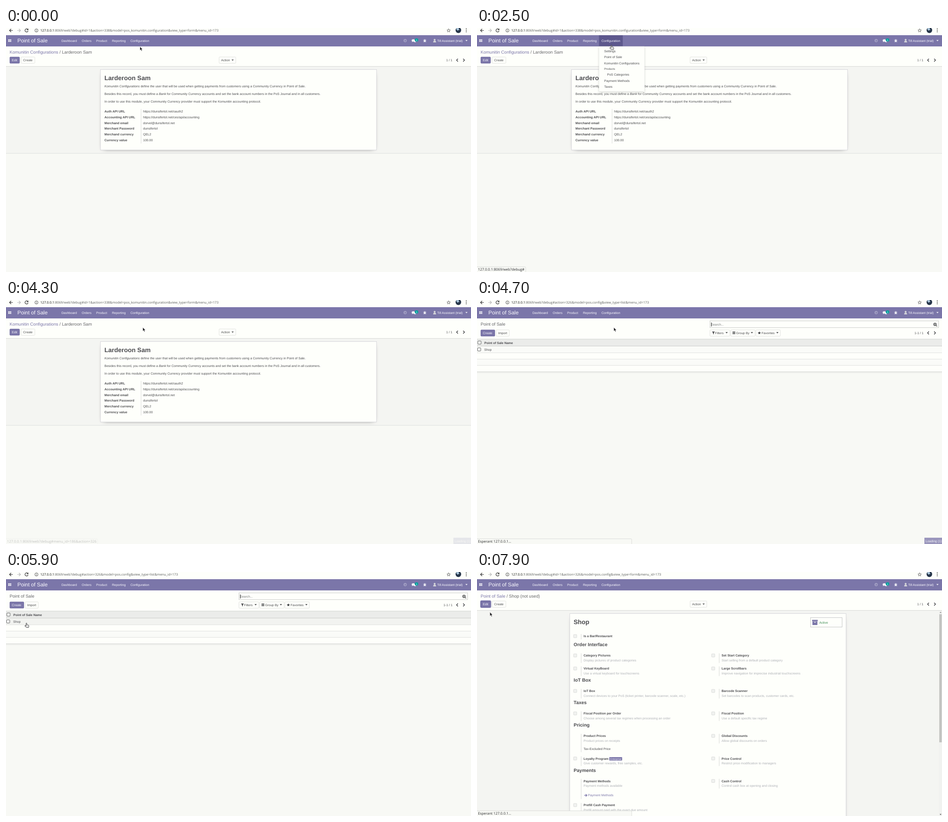
An HTML page for the animation above (8 s loop, 1031 by 543 pixels).

```html
<!DOCTYPE html>
<html lang="en">
<head>
<meta charset="utf-8">
<title>Point of Sale</title>
<style>
html, body { margin: 0; width: 100%; height: 100%; overflow: hidden; background: #f8f9f5; }
svg { display: block; width: 100%; height: 100%; }
text { font: 7px "Liberation Sans", Arial, sans-serif; fill: #4b4b4f; text-rendering: geometricPrecision; white-space: pre; }
.b { font-weight: bold; }
.i { font-style: italic; }
.w { fill: #fbfaff; }
.brand { font-size: 11.8px; }
.crumb { font-size: 9.66px; fill: #66666a; }
.link { fill: #7b76a9; }
.h1 { font-size: 13.95px; font-weight: bold; }
.h2 { font-size: 10.46px; font-weight: bold; }
.soft { fill: #adafb5; }
.hint { fill: #77797b; }
.ok { fill: #3a8a50; }
.small { font-size: 6.1px; }
.tiny { font-size: 5.4px; }
.url { font: 7.35px "Open Sans", "Noto Sans", sans-serif; fill: #5b5d5f; }
.host { fill: #0c0d0e; }
.status { font: 7.85px "Open Sans", "Noto Sans", sans-serif; fill: #2a2b2d; }
</style>
</head>
<body>
<svg viewBox="0 0 1031 543" xmlns="http://www.w3.org/2000/svg">
  <defs>
    <pattern id="hatch" width="3" height="3" patternUnits="userSpaceOnUse">
      <rect width="3" height="3" fill="#f8f8f5"/>
      <path d="M-1 1L1 -1M0 3L3 0M2 4L4 2" stroke="#eaebe8" stroke-width=".8"/>
    </pattern>
    <filter id="blur" x="-10%" y="-20%" width="120%" height="140%">
      <feGaussianBlur stdDeviation="5.4"/>
    </filter>
    <filter id="lift" x="-10%" y="-10%" width="120%" height="120%">
      <feDropShadow dx="0" dy="2" stdDeviation="2" flood-color="#000" flood-opacity=".15"/>
    </filter>
  </defs>
  <g id="stage"></g>
</svg>
<script>
const PURPLE = '#7b76a9', DARK = '#3f4043', WHITE = '#fefffb', PAGE = '#f8f9f5';
const HOST = '127.0.0.1', WEB = ':8069/web?debug#';

// Markup helpers
const rect = (x, y, w, h, fill, more = '') =>
  `<rect x="${x}" y="${y}" width="${w}" height="${h}" fill="${fill}" ${more}/>`;
const path = (d, stroke, width = 1, fill = 'none', more = '') =>
  `<path d="${d}" stroke="${stroke}" stroke-width="${width}" fill="${fill}" ${more}/>`;
const shape = (d, fill) => `<path d="${d}" fill="${fill}"/>`;
const text = (x, y, s, cls = '') => `<text x="${x}" y="${y}" class="${cls}">${s}</text>`;
const span = (s, cls) => `<tspan class="${cls}">${s}</tspan>`;
const group = (id, body) => `<g id="${id}">${body}</g>`;
const hline = (y, color, w = 1031) => rect(0, y, w, 1, color);
const caret = (x, y, fill = DARK) => shape(`M${x} ${y}h5l-2.5 2.6z`, fill);
const button = (x, y, w, label, main) =>
  rect(x + .5, y + .5, w - 1, 14, main ? PURPLE : WHITE, `rx="1.5" stroke="${main ? PURPLE : '#e2e3e0'}"`) +
  text(x + 5, y + 10.1, label, main ? 'w' : '');
const checkbox = (x, y, fill, stroke) => rect(x + .5, y + .5, 7, 7, fill, `stroke="${stroke}" rx=".8"`);
const chevrons = y => path(`M1002 ${y - 3.2}l-3 3.2 3 3.2M1013.6 ${y - 3.2}l3 3.2-3 3.2`, DARK, 1.5);

const star = (x, y, r) => 'M' + Array.from({ length: 10 }, (_, i) => {
  const a = i * Math.PI / 5 - Math.PI / 2, k = i % 2 ? r * .45 : r;
  return `${(x + k * Math.cos(a)).toFixed(2)} ${(y + k * Math.sin(a)).toFixed(2)}`;
}).join('L') + 'Z';

function browserBar() {
  return rect(0, 0, 1031, 16, WHITE) +
    path('M15 5.5H8M11.3 2L7.8 5.5l3.5 3.5', '#333', 1.2) +
    path('M25 5.5h7M28.7 2l3.5 3.5-3.5 3.5', '#b6b7b7', 1.2) +
    path('M48.3 3.2A3.5 3.5 0 1 0 49 6.3', '#333', 1.2) + shape('M49.5 1v3.7h-3.7z', '#333') +
    `<circle cx="67.5" cy="5.5" r="3.5" fill="none" stroke="#555"/>` +
    rect(67, 5, 1, 2.5, '#555') + rect(67, 3.3, 1, 1, '#555') +
    `<text x="76" y="8.2" class="url" id="url"></text>` +
    path(star(981.5, 5.7, 4), '#555', .9) +
    `<circle cx="1003" cy="5" r="6.2" fill="#27364a"/>` +
    shape('M998 2a6.2 6.2 0 0 1 5-3l2 5-4 2z', '#a9c3d8') +
    [1.8, 5.2, 8.6].map(y => `<circle cx="1020.5" cy="${y}" r="1" fill="#444"/>`).join('');
}

function navBar() {
  const items = [[123, 'Dashboard'], [168, 'Orders'], [200, 'Product'], [235, 'Reporting'], [276, 'Configuration']];
  const dim = '#cfcde2', lit = '#f2f1f8';
  return rect(0, 16, 1031, 25, PURPLE) +
    group('tab', rect(270.5, 16, 52.7, 25, '#5d588d')) +
    [0, 3.6].map(dx => rect(5 + dx, 25.2, 3, 2.5, lit) + rect(5 + dx, 28.4, 3, 2.5, lit)).join('') +
    text(25.3, 32.4, 'Point of Sale', 'brand w') +
    items.map(([x, s]) => text(x, 30.6, s, 'w')).join('') +
    `<circle cx="885" cy="28" r="3" fill="none" stroke="${dim}" stroke-width=".8"/>` +
    path('M885 26v2.2h-1.6', dim, .7) +
    `<ellipse cx="903" cy="27.6" rx="3.6" ry="2.7" fill="${lit}"/><ellipse cx="906" cy="29.5" rx="2.6" ry="2" fill="${lit}"/>` +
    shape('M900.5 29l-.6 2.6 3-1.6zM906 31l3 1-.8-2z', lit) +
    rect(906.5, 23, 7.5, 7.2, '#00a09d', 'rx="3.4"') + text(908.9, 28.5, '1', 'tiny w') +
    `<ellipse cx="928.5" cy="28.6" rx="1.9" ry="2.7" fill="${lit}"/>` +
    path('M925.3 26l2 1.5M931.7 26l-2 1.5M925 28.8h7M925.6 31.5l2-1.5M931.4 31.5l-2-1.5M927.2 25.4h2.6', lit, .8) +
    `<circle cx="950.4" cy="26.4" r="2.1" fill="#d6d6da"/>` +
    shape('M947 32q.1-3 2.2-3.4h2.4q2.1.4 2.2 3.4z', '#d6d6da') +
    text(956, 30.6, 'Till Assistant (trial)', 'w') + caret(1018.5, 26.8, lit);
}

const panel = (h, link, name) => rect(0, 41, 1031, h, WHITE) +
  text(8, 56.5, link ? span(link, 'link') + ' / ' + name : name, 'crumb');

const formPanel = (link, name) => panel(44, link, name) + hline(85, '#d6d7d5') +
  button(8, 64, 22.5, 'Edit', true) + button(33, 64, 31.5, 'Create') +
  button(472, 64, 38, 'Action') + caret(500, 70.2) +
  text(976, 74.2, '1 / 1') + chevrons(71.6);

const sheet = (x, y, w, h) =>
  rect(x + 8, y + 10.7, w - 16, h - 16, '#000', 'filter="url(#blur)"') +
  rect(x + .3, y + .5, w - .6, h - 1, WHITE, 'stroke="#c9c9d2" stroke-width=".7"');

function accountForm() {
  const fields = [
    ['Auth API URL', 'https://dunsifertol.net/oauth2'],
    ['Accounting API URL', 'https://dunsifertol.net/ces/api/accounting'],
    ['Merchand email', 'dorvel@dunsifertol.net'],
    ['Merchant Password', 'dunsifertol'],
    ['Merchand currency', 'QEL2'],
    ['Currency value', '100.00']
  ];
  return rect(0, 85, 1031, 194, 'url(#hatch)') + formPanel('Komunitin Configurations', 'Larderoon Sam') +
    hline(278.5, '#dedfdd') + sheet(209, 92, 613, 180) +
    text(218.3, 116.4, 'Larderoon Sam', 'h1') +
    text(218.3, 132.3, span('Komunitin Configurations', 'i') + ' define the user that will be used when getting payments from customers using a Community Currency in Point of Sale.') +
    text(218.3, 149, 'Besides this record, you must define a ' + span('Bank', 'i') + ' for Community Currency accounts and set the bank account numbers in the PoS Journal and in all customers.') +
    text(218.3, 165.6, 'In order to use this module, your Community Currency provider must support the Komunitin accounting protocol.') +
    rect(299, 180, 1, 77, '#dcdddc') +
    fields.map(([k, v], i) => text(218.3, 187.7 + 12.9 * i, k, 'b') + text(304, 187.7 + 12.9 * i, v)).join('');
}

function dropdown() {
  const items = [[282, 53.7, 'Settings'], [282, 67.2, 'Point of Sale'], [282, 80.6, 'Komunitin Configurations'],
    [282, 93, 'Products', 'small'], [288.5, 106.3, 'PoS Categories'], [282, 120, 'Payment Methods'], [282, 133.4, 'Taxes']];
  return rect(270.7, 41, 100.6, 100, WHITE, 'stroke="#e2e3e1" stroke-width=".5" filter="url(#lift)"') +
    `<rect id="pick" x="271" width="100" height="13.4" fill="#e8eaea"/>` +
    items.map(([x, y, s, cls]) => text(x, y, s, cls)).join('');
}

function shopList() {
  return panel(46, '', 'Point of Sale') +
    button(8, 66, 32, 'Create', true) + button(42, 66, 30, 'Import') +
    rect(516.5, 46.5, 507, 15, WHITE, 'stroke="#cbccca"') +
    text(519, 57.2, 'Search...', 'hint') +
    group('caret', rect(519, 50, 1, 9, '#222')) +
    `<circle cx="1015.5" cy="54.2" r="2.8" fill="none" stroke="${DARK}" stroke-width="1.3"/>` +
    path('M1017.6 56.3l2.5 2.6M1014 54.2h3', DARK, 1.2) +
    [[516, 45], [562, 55], [618, 55]].map(([x, w]) => button(x, 66, w, '')).join('') +
    shape('M521 70.2h6.4l-2.4 3v3.4l-1.6-1.2v-2.2z', DARK) + text(527.7, 75.8, 'Filters') + caret(551, 71.6) +
    [70.2, 72.4, 74.6].map(y => rect(566.5, y, 6.2, 1.3, DARK)).join('') + text(574.5, 75.8, 'Group By') + caret(607, 71.6) +
    shape(star(626, 73.4, 3.6), DARK) + text(631, 75.8, 'Favorites') + caret(663.5, 71.6) +
    text(970, 75.8, '1-1 / 1') + chevrons(73.2) +
    rect(0, 87, 1031, 15, '#ebecea') + hline(86.5, '#d2d3d1') + hline(102, '#cbccca') +
    checkbox(1.5, 90.7, WHITE, '#5b5c5e') + text(16.3, 97.5, 'Point of Sale Name', 'b') +
    `<rect id="row" y="103" width="1031" height="14"/>` +
    rect(0, 117, 1031, 42, WHITE) + rect(0, 132, 1031, 13, '#fafbf8') +
    hline(117, '#e0e1df') + hline(131, '#e0e1df') + hline(145, '#e0e1df') +
    rect(0, 159, 1031, 3.5, '#ecedea') + hline(159, '#d9dad8') +
    checkbox(.8, 106, WHITE, '#5b5c5e') + text(16, 112.5, 'Shop');
}

function shopForm() {
  const heads = [[161, 'Order Interface'], [240, 'IoT Box'], [290, 'Taxes'], [340, 'Pricing'], [441, 'Payments']];
  // column, centre line, title, description, bar height when there is no checkbox
  const options = [
    [0, 143, 'Is a Bar/Restaurant', ''],
    [0, 186, 'Category Pictures', 'Display pictures of product categories'],
    [1, 186, 'Set Start Category', 'Start selling from a default product category'],
    [0, 215, 'Virtual KeyBoard', 'Use a virtual keyboard for touchscreens'],
    [1, 215, 'Large Scrollbars', 'Improve navigation for imprecise industrial touchscreens'],
    [0, 265, 'IoT Box', 'Connect devices to your PoS (ticket printer, barcode scanner, scale, etc.)'],
    [1, 265, 'Barcode Scanner', 'Set barcodes to scan products, customer cards, etc.'],
    [0, 315, 'Fiscal Position per Order', 'Choose among several tax regimes when processing an order'],
    [1, 315, 'Fiscal Position', 'Use a default specific tax regime'],
    [0, 365, 'Product Prices', 'Product prices on receipts', 41],
    [1, 365, 'Global Discounts', 'Allow global discounts on orders'],
    [0, 415.3, 'Loyalty Program', 'Give customer rewards, free samples, etc.'],
    [1, 415.3, 'Price Control', 'Restrict price modification to managers'],
    [0, 465.3, 'Payment Methods', 'Payment methods available', 45],
    [1, 465.3, 'Cash Control', 'Control cash box at opening and closing'],
    [0, 519, 'Prefill Cash Payment', 'Prefill amount paid with the exact due amount']
  ];
  const option = ([col, y, title, desc, bar]) => {
    const x = 214 + 306 * col;
    return (bar ? '' : checkbox(x - .3, y - 4.3, '#f1f2f0', '#dadbd9')) +
      rect(x + 16.5, y - 5, 1, bar || (desc ? 21.5 : 12), '#d6d7d5') +
      text(x + 22.3, y + 2.4, title, 'b') + text(x + 22.3, y + 12.7, desc, 'soft');
  };
  return rect(0, 85, 1031, 458, 'url(#hatch)') + formPanel('Point of Sale', 'Shop (not used)') +
    rect(7.5, 63.5, 23.5, 16, 'none', 'rx="2" stroke="#aaa7cb" stroke-width="1.2"') +
    rect(8.5, 64.5, 21.5, 14, 'none', 'rx="1.5" stroke="#625d97"') +
    sheet(205.5, 92, 613, 480) + text(214.3, 116.4, 'Shop', 'h1') +
    rect(739.5, 101.5, 70, 21, WHITE, 'stroke="#c6c7c8"') +
    rect(743, 106.5, 12.5, 3.2, PURPLE) + rect(743.7, 110.2, 11, 7.8, PURPLE) + rect(747.4, 111.4, 3.8, 1.2, WHITE) +
    text(759, 114.6, 'Active', 'ok') +
    heads.map(([y, s]) => text(214.3, y + 3.8, s, 'h2')).join('') + options.map(option).join('') +
    text(236.3, 396.4, 'Tax-Excluded Price') +
    rect(293.3, 412, 28.5, 7.6, PURPLE, 'rx="1"') + text(295.3, 417.7, 'Enterprise', 'tiny w') +
    path('M238 497h5.5M241 494.3l2.8 2.7-2.8 2.7', PURPLE, 1.3) + text(246, 499.4, 'Payment Methods', 'link') +
    rect(1024.5, 86, 6.5, 457, '#f1f2f0') + rect(1025, 94, 5.5, 285, '#c2c3c1') +
    shape('M1025.8 91h4l-2-2.4z', '#8a8b8a') + shape('M1025.8 538.5h4l-2 2.4z', '#555');
}

const statusBar = `<path id="statusBox" fill="${PAGE}" stroke="#d4d5d2" stroke-width=".8"/>` +
  `<text id="statusText" class="status" x="2.2" y="540.4"></text>`;
const loadingBox = rect(992, 529, 39, 14, PURPLE) + text(994.8, 538.8, 'Loading (1)', 'w');
const arrow = path('M0 0V8.2L1.9 6.5 3.3 9.8 4.7 9.2 3.4 6H5.8Z', '#fff', .5, '#1d1d1f');
const hand = path('M-1 1a.9.9 0 0 1 1.8 0V4l3 .6q1.5.4 1.3 1.9L4.5 10H-.6L-3.7 6.5q-.2-1.2 1.1-.9L-1 7Z', '#2a2a2c', .9, '#fff') +
  path('M1 6.2v2M2.5 6.4v1.8', '#555', .5);

document.getElementById('stage').innerHTML = rect(0, 0, 1031, 543, PAGE) +
  group('account', accountForm()) + group('list', shopList()) + group('shop', shopForm()) +
  browserBar() + navBar() + group('menu', dropdown()) +
  group('status', statusBar) + group('loading', loadingBox) +
  group('pointer', group('arrow', arrow) + group('hand', hand));

const el = {};
document.querySelectorAll('[id]').forEach(n => el[n.id] = n);

// Timelines
const loadingFade = [[3600, 0], [3900, 1], [4000, 1], [4350, 0], [4400, 0], [4500, 1], [4600, 1], [5000, 0],
  [6200, 0], [6400, 1], [7300, 1], [7500, 0]];
const statusFade = [[400, 0], [900, 1], [4000, 1], [4400, 0], [4600, 0], [4700, 1], [5000, 1], [5300, 0], [7000, 0], [7100, 1]];
const pointerStops = [
  [0, 297, 41.5, 'arrow'], [200, 297, 42], [400, 298.5, 38.5, 'hand'], [1900, 298, 38.5], [2000, 298, 38],
  [2800, 298, 37.5], [2900, 298, 37], [3300, 300, 49], [3500, 303, 61], [3700, 303.3, 61, 'arrow'],
  [5500, 262, 72], [5600, 185, 92], [5700, 110, 108, 'hand'], [5800, 62, 115.5], [5900, 45.5, 113.5],
  [6000, 39.5, 113.5], [6200, 33, 112], [6300, 27, 111], [7100, 26, 111.5, 'arrow'], [7900, 28.7, 89.5]
];

function fade(keys, t) {
  const i = keys.findIndex(k => k[0] > t);
  if (i === 0) return keys[0][1];
  if (i < 0) return keys[keys.length - 1][1];
  const [t0, a] = keys[i - 1], [t1, b] = keys[i];
  return a + (b - a) * (t - t0) / (t1 - t0);
}

const within = (t, a, b) => t >= a && t < b;
const show = (node, on) => node.style.display = on ? '' : 'none';

function address(t) {
  const tail = '&view_type=';
  if (t < 4700) return 'id=1&action=338&model=pos_komunitin.configuration' + tail + 'form';
  if (t < 7100) return 'action=326&model=pos.config' + tail + 'list';
  return 'id=1&action=326&model=pos.config' + tail + 'form';
}

function statusLine(t) {
  if (t >= 4600) return [`Esperant ${HOST}...`, 343];
  if (t < 3300) return [HOST + WEB, 108];
  return [HOST + WEB + (t < 3500 ? 'menu_id=172&action=341' : 'menu_id=186&action=326'), 203];
}

function draw(time) {
  const t = Math.floor(time / 100) * 100;   // each pose holds for a tenth of a second

  show(el.account, t < 4700);
  show(el.list, within(t, 4700, 7400));
  show(el.shop, t >= 7400);
  show(el.tab, within(t, 400, 3700));
  show(el.menu, within(t, 2500, 3700));
  show(el.pick, t >= 3300);
  el.pick.setAttribute('y', t < 3500 ? 44.5 : 58);
  show(el.caret, within(t, 4700, 5300) || within(t, 5800, 6300));
  el.row.setAttribute('fill', t >= 5700 ? '#f2f3f0' : '#fafbf8');

  el.url.innerHTML = span(HOST, 'host') + (WEB + address(t) + '&menu_id=173').replace(/&/g, '&amp;');

  const [line, w] = statusLine(t);
  el.statusText.textContent = line;
  el.statusBox.setAttribute('d', `M-1 531.4H${w - 2}q2 0 2 2V544H-1Z`);
  el.status.style.opacity = fade(statusFade, t);
  el.loading.style.opacity = fade(loadingFade, t);

  let kind, x, y;
  for (const [at, px, py, k] of pointerStops) {
    if (at > t) break;
    x = px; y = py; kind = k || kind;
  }
  el.pointer.setAttribute('transform', `translate(${x} ${y})`);
  show(el.arrow, kind === 'arrow');
  show(el.hand, kind === 'hand');
}

const start = performance.now();
function tick() {
  draw(Math.max(0, performance.now() - start) % 8000);
  requestAnimationFrame(tick);
}
tick();
</script>
</body>
</html>
```
